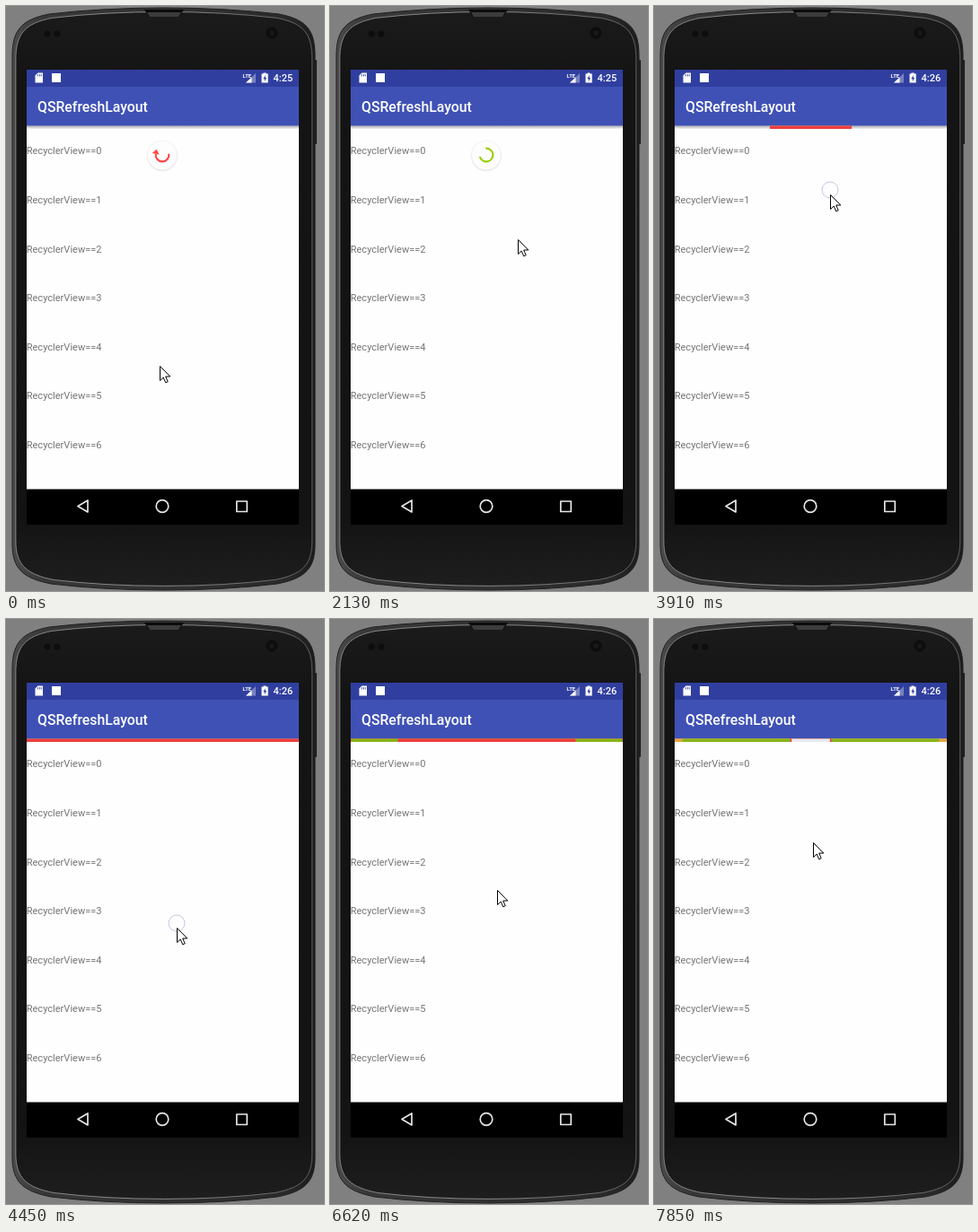
Write an HTML page that moves like this. It is 354x652 px and loops after 8 s.

```html
<!DOCTYPE html>
<html lang="en">
<head>
<meta charset="utf-8">
<title>Pull to refresh</title>
<style>
  html, body { margin: 0; width: 100%; height: 100%; overflow: hidden; background: #808080; }
  svg { display: block; width: 100%; height: 100%; }
  text { font-family: Roboto, sans-serif; }
</style>
</head>
<body>
<svg viewBox="0 0 354 652">
  <defs>
    <linearGradient id="body" x2="0" y2="1">
      <stop offset="0" stop-color="#1b1b1b"/>
      <stop offset=".12" stop-color="#141414"/>
      <stop offset=".88" stop-color="#131313"/>
      <stop offset="1" stop-color="#1e1e1e"/>
    </linearGradient>
    <linearGradient id="rim">
      <stop offset="0" stop-color="#4a4a4a"/>
      <stop offset=".1" stop-color="#383838"/>
      <stop offset=".9" stop-color="#2a2a2a"/>
      <stop offset="1" stop-color="#1c1c1c"/>
    </linearGradient>
    <linearGradient id="glint">
      <stop offset="0" stop-color="#858585"/>
      <stop offset=".5" stop-color="#8c8c8c"/>
      <stop offset="1" stop-color="#606060"/>
    </linearGradient>
    <linearGradient id="shade" x2="0" y2="1">
      <stop offset="0" stop-color="#223" stop-opacity=".38"/>
      <stop offset="1" stop-color="#223" stop-opacity="0"/>
    </linearGradient>
    <filter id="lift" x="-30%" y="-30%" width="160%" height="160%">
      <feDropShadow dx="0" dy=".5" stdDeviation=".8" flood-opacity=".24"/>
    </filter>
    <path id="shell" d="M7 56C7 26 18 15 48 9Q108 2 176 2Q244 2 304 9C334 15 344 26 344 56V600C344 628 332 638 302 644Q244 651 176 651Q108 651 50 644C20 638 7 628 7 600Z"/>
    <clipPath id="list"><rect x="23" y="133" width="303" height="406"/></clipPath>
  </defs>

  <rect width="354" height="652" fill="#808080"/>
  <rect x="342" y="60" width="4" height="94" rx="1" fill="#222"/>
  <use href="#shell" fill="url(#rim)" stroke="#202020"/>
  <use href="#shell" fill="url(#body)" stroke="url(#glint)" transform="translate(4 4.500) scale(.979 .986)"/>
  <path d="M154 4H198L193 12H159Z" fill="#0c0c0c"/>
  <path d="M157 7H195L192 12H160Z" fill="#3c3c3c"/>
  <g fill="#0d0d0d">
    <circle cx="46" cy="31" r="3.500"/><circle cx="57" cy="31" r="3.500"/>
    <circle cx="296" cy="30" r="6.500"/><circle cx="296" cy="30" r="3" fill="#181818"/>
  </g>

  <rect x="23" y="71" width="303" height="507" fill="#000"/>
  <rect x="23" y="133" width="303" height="405.500" fill="#fefefe"/>
  <rect x="23" y="71" width="303" height="19" fill="#303f9f"/>
  <rect x="23" y="90" width="303" height="43.500" fill="#3f51b5"/>

  <g fill="#fff">
    <path d="M35.500 74.500H41V85.500H32.500V77.500Z"/>
    <path d="M35.500 76V78.500M37.500 76V78.500M39.300 76V78.500" stroke="#303f9f" stroke-width=".8"/>
    <rect x="51" y="75" width="10" height="10"/>
    <text x="263.500" y="79.500" font-size="6" font-weight="700">LTE</text>
    <path d="M278 75V85.500H267Z" opacity=".35"/>
    <path d="M273.500 79.500V85.500H267Z"/>
    <path d="M286.500 74.500H289.500V75.500H291.700V85.500H284.500V75.500H286.500Z"/>
    <path d="M288.600 77L286.300 81.200H287.800V84.300L290.100 80H288.600Z" fill="#303f9f"/>
    <text id="clock" x="297.500" y="84.300" font-size="11.050" font-weight="500"></text>
    <text x="35" y="118.300" font-size="15.800" font-weight="500">QSRefreshLayout</text>
  </g>
  <g id="rows" fill="#757575" font-size="11.050"></g>
  <g fill="none" stroke="#e6e6e6" stroke-width="1.700" stroke-linejoin="round">
    <path d="M91 551V564L80 557.500Z"/>
    <circle cx="174" cy="557.500" r="6.800"/>
    <rect x="256.800" y="552" width="11.500" height="11.500"/>
  </g>

  <rect x="23" y="133.500" width="303" height="4" fill="url(#shade)"/>
  <g id="bar"></g>

  <g id="spinner" clip-path="url(#list)">
    <circle cx="174" cy="166.500" r="15.800" fill="#fdfdfd" filter="url(#lift)"/>
    <path id="arc" fill="none" stroke-width="2.100"/>
    <path id="head" d="M-4 0H4L0 5Z"/>
  </g>
  <circle id="touch" r="9" fill="#fff" fill-opacity=".3" stroke="#c4c5e2"/>
  <path id="cursor" d="M.5 .5V16.500L4.200 13L6.700 18.800L9.200 17.700L6.700 12H11.800Z" fill="#fff" stroke="#000"/>
</svg>
<script>
const LOOP = 8000;
const RED = [238, 62, 62], ORANGE = [234, 166, 62], GREEN = [138, 180, 24], CLEAR = [232, 232, 244];
const SPIN_COLORS = [[255, 68, 68], [255, 187, 51], [153, 204, 0]];
const BAR = { cx: 174.5, half: 151.5, y: 133.5, h: 3.5 };
const $ = id => document.getElementById(id);
const rgb = c => `rgb(${c.map(Math.round)})`;
const clamp = v => Math.min(1, Math.max(0, v));
const mix = (a, b, p) => a.map((v, i) => v + (b[i] - v) * p);

// [first, last, count]: runs of evenly spaced picture updates
const RUNS = [[0, 0, 1], [150, 1080, 8], [1200, 2130, 8], [2280, 3210, 8], [3330, 3480, 2],
  [3760, 4450, 6], [4570, 4720, 2], [4870, 4990, 2], [5420, 5840, 4], [5960, 6350, 4],
  [6470, 6620, 2], [6770, 7460, 6], [7580, 7850, 3]];
const TICKS = RUNS.flatMap(([a, b, n]) =>
  Array.from({ length: n }, (_, i) => Math.round((a + (b - a) * i / Math.max(1, n - 1)) / 10) * 10));

// [time, x, y]
const CURSOR = [[0, 171, 401], [1080, 210, 263], [1200, 210, 262], [2130, 209, 260], [2400, 209, 260],
  [3210, 194, 192], [3480, 197, 174], [3760, 197, 176], [4450, 190, 344], [4720, 188, 358],
  [4870, 189, 366], [5960, 189, 366], [6350, 189, 358], [6620, 186, 302], [7460, 181, 281], [7850, 177, 249]];
// [time, percent of one bar cycle, counted on over cycles]
const BAR_START = 5236, BAR_STOP = 7646;
const PROGRESS = [[0, 0], [BAR_START, 0], [5840, 30.2], [6620, 71], [7850, 160.5]];

function track(keys, t) {
  const i = keys.findIndex(k => k[0] > t);
  if (i < 0) return keys[keys.length - 1].slice(1);
  const a = keys[i - 1], b = keys[i];
  return mix(a.slice(1), b.slice(1), (t - a[0]) / (b[0] - a[0]));
}

// cubic-bezier(.4, 0, .2, 1)
function ease(x) {
  x = clamp(x);
  let lo = 0, hi = 1, s = .5;
  for (let i = 0; i < 24; i++) {
    s = (lo + hi) / 2;
    const bx = 1.2 * (1 - s) ** 2 * s + .6 * (1 - s) * s * s + s ** 3;
    if (bx < x) lo = s; else hi = s;
  }
  return 3 * (1 - s) * s * s + s ** 3;
}

function spinnerState(t) {
  const settle = 420, cycle = 1332;
  let n, p, start, end;
  if (t < settle) {
    p = t / settle;
    n = -1;
    end = 190 + 222 * p;
    start = end - 200 + 185 * p;
  } else {
    n = Math.floor((t - settle) / cycle);
    p = (t - settle) / cycle % 1;
    const base = 37 + 162 * n + 234 * p;
    start = base + 288 * ease(2 * p - 1);
    end = base + 15 + 288 * ease(2 * p);
  }
  const color = mix(SPIN_COLORS[(n + 1) % 3], SPIN_COLORS[(n + 2) % 3], clamp(p * 4 - 3));
  return { start, end, color, arrow: n < 0 ? 1 - p * .5 : 0 };
}

function drawSpinner(t) {
  const scale = clamp(1 - (t - 2960) / 180);
  $("spinner").style.display = scale ? "" : "none";
  if (!scale) return;
  $("spinner").setAttribute("transform", `translate(174 166.500) scale(${scale}) translate(-174 -166.500)`);
  const { start, end, color, arrow } = spinnerState(t);
  const at = deg => [174 + 7.4 * Math.cos(deg * Math.PI / 180), 166 + 7.4 * Math.sin(deg * Math.PI / 180)];
  $("arc").setAttribute("d", `M${at(start)}A7.400 7.400 0 ${end - start > 180 ? 1 : 0} 1 ${at(end)}`);
  $("arc").setAttribute("stroke", rgb(color));
  $("head").setAttribute("fill", rgb(color));
  $("head").setAttribute("transform", `translate(${at(end)}) rotate(${end}) scale(${arrow})`);
}

function barLayers(t) {
  if (t < 3760) return [];
  if (t < BAR_START) return [[RED, clamp((track(CURSOR, t)[1] - 174) / 120)]];
  const total = track(PROGRESS, t)[0], raw = total % 100;
  const wheel = [RED, ORANGE, GREEN, RED];
  const layers = [[total < 100 ? RED : wheel[(Math.floor(raw / 25) + 3) % 4], 1]];
  const grow = (color, from, to, origin) => {
    if (raw >= from && raw < to) layers.push([color, ease((raw - origin) / 50)]);
  };
  grow(RED, 0, 25, -25);
  grow(ORANGE, 0, 50, 0);
  grow(GREEN, 25, 75, 25);
  grow(RED, 50, 100, 50);
  grow(RED, 75, 100, 75);
  const gap = ease((t - BAR_STOP) / 1000);
  if (gap) layers.push([CLEAR, gap]);
  return layers;
}

function drawBar(t) {
  $("bar").innerHTML = barLayers(t).map(([color, r]) =>
    `<rect x="${BAR.cx - BAR.half * r}" y="${BAR.y}" width="${2 * BAR.half * r}" height="${BAR.h}" fill="${rgb(color)}"/>`).join("");
}

function draw(t) {
  const [x, y] = track(CURSOR, t).map(Math.round);
  $("cursor").setAttribute("transform", `translate(${x} ${y})`);
  $("touch").setAttribute("transform", `translate(${x} ${t < 4600 ? y - 5 : y})`);
  $("touch").style.display = t >= 3760 && t < 4990 ? "" : "none";
  $("clock").textContent = t < 2680 ? "4:25" : "4:26";
  drawSpinner(t);
  drawBar(t);
}

$("rows").innerHTML = Array.from({ length: 7 }, (_, i) =>
  `<text x="22.700" y="${165.3 + 54.6 * i}">RecyclerView==${i}</text>`).join("");

let shown = -1;
function play() {
  const now = performance.now() % LOOP;
  const tick = TICKS.filter(k => k <= now).pop();
  if (tick !== shown) draw(shown = tick);
  requestAnimationFrame(play);
}
play();
</script>
</body>
</html>
```
